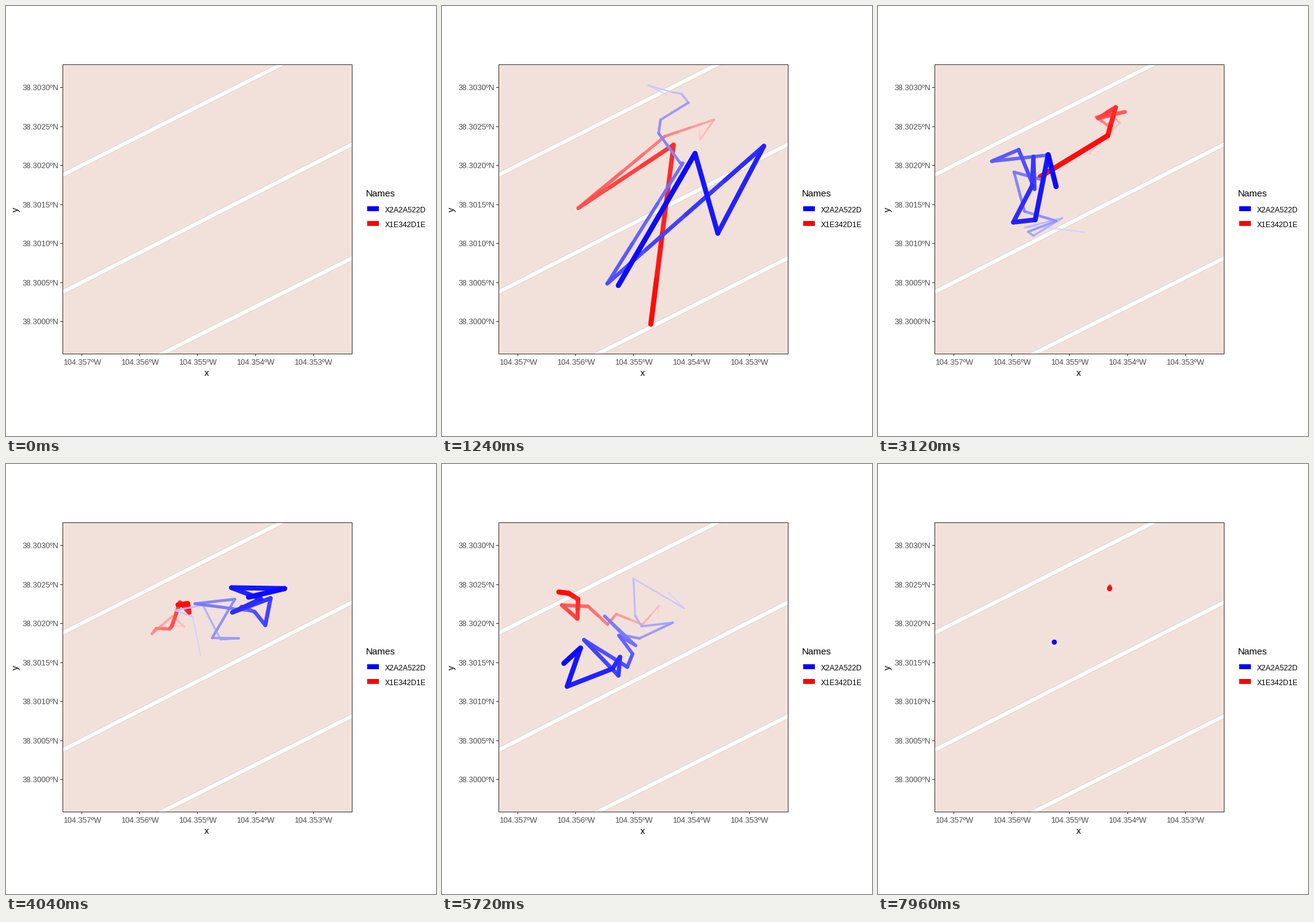
A matplotlib script that plays this animation: 700 by 700 pixels, repeating every 8000 ms.

```python
import numpy as np
import matplotlib.pyplot as plt
from matplotlib.animation import FuncAnimation
from matplotlib.collections import LineCollection
from matplotlib.patches import Rectangle

SIZE, DPI = 700, 100
FRAMES, INTERVAL = 200, 40
TAIL = 20                      # fixes shown at once
FADE = 23                      # steps until a segment would be white
THIN, THICK = 2.2, 8.7         # tail widths in pixels
REST = 178                     # both animals settle down here
PT = 72 / DPI
LEFT, TOP, SIDE = 92.5, 95.5, 471

plt.rcParams["font.family"] = "Liberation Sans"

# turning points (frame, x, y) of each animal
RED_TURNS = [(0, 300, 260), (16, 443, 185), (20, 363, 212), (24, 222, 329),
             (27, 377, 226), (31, 340, 518), (34, 384, 319), (37, 262, 478),
             (42, 145, 368), (46, 265, 310), (48, 380, 211), (50, 346, 262),
             (74, 387, 165), (77, 374, 211), (78, 264, 278), (117, 297, 191),
             (119, 308, 243), (123, 320, 184), (124, 351, 250), (146, 131, 220),
             (155, 360, 289), (157, 270, 242), (161, 387, 188),
             (REST, 378, 195), (199, 377, 203)]
BLUE_TURNS = [(0, 330, 240), (15, 390, 143), (21, 392, 256), (24, 269, 452),
              (28, 524, 228), (29, 449, 370), (30, 412, 240), (31, 287, 455),
              (40, 239, 376), (48, 396, 354), (49, 266, 422), (50, 374, 324),
              (63, 253, 374), (71, 229, 234), (76, 256, 348), (77, 277, 242),
              (78, 290, 294), (105, 432, 202), (117, 392, 303), (124, 369, 209),
              (144, 219, 355), (154, 254, 403), (157, 388, 185),
              (160, 254, 362), (161, 367, 172),
              (REST, 287, 289), (199, 287, 290)]


def roam(turns, spread, step, seed):
    """One fix per frame: short hops are straight, longer ones wander."""
    rng = np.random.default_rng(seed)
    fixes = [turns[0]]
    for (t0, x0, y0), (t1, x1, y1) in zip(turns, turns[1:]):
        if t1 - t0 > 4 and t0 < REST:
            for t in range(t0 + step, t1, step):
                u = (t - t0) / (t1 - t0)
                dx, dy = rng.uniform(-1, 1, 2) * spread
                fixes.append((t, x0 + u * (x1 - x0) + dx, y0 + u * (y1 - y0) + dy))
        fixes.append((t1, x1, y1))
    t, x, y = np.array(fixes, float).T
    n = np.arange(FRAMES)
    return np.column_stack([np.interp(n, t, x), np.interp(n, t, y)])


fig = plt.figure(figsize=(SIZE / DPI, SIZE / DPI), dpi=DPI, facecolor="white")
ax = fig.add_axes([0, 0, 1, 1])
ax.set_xlim(0, SIZE)
ax.set_ylim(SIZE, 0)
ax.axis("off")


def box(x, y, w, h, **kw):
    patch = Rectangle((x, y), w, h, snap=False, **kw)
    ax.add_patch(patch)
    return patch


def line(x, y, colour, width, **kw):
    return ax.plot(x, y, color=colour, lw=width * PT, snap=False,
                   solid_capstyle="butt", **kw)[0]


def label(x, y, text, px, colour="black", **kw):
    ax.text(x, y, text, fontsize=px * PT, color=colour, **kw)


# map panel with three roads
panel = box(LEFT, TOP, SIDE, SIDE, fc="#f2e1da", ec="none", zorder=0)
roads = [((72, 285.3), (470, 84)),
         ((72, 476), (583, 215)),
         ((235, 575.5), (583, 400.5))]
for (x0, y0), (x1, y1) in roads:
    for colour, width in (("#e0d5cf", 8), ("white", 6)):
        line((x0, x1), (y0, y1), colour, width, zorder=1).set_clip_path(panel)
box(LEFT, TOP, SIDE, SIDE, fc="none", ec="#333333", lw=PT, zorder=5)

# axes
for i in range(7):
    y = round(512.9 - 63.4 * i) + 0.5
    line((88, 92), (y, y), "#333333", 1)
    label(85.3, y + 4.5, f"{38.3 + 0.0005 * i:.4f}ºN", 12.6, "#4d4d4d", ha="right")
for i in range(5):
    x = round(122.6 + 94.4 * i) + 0.5
    line((x, x), (567, 570), "#333333", 1)
    label(x, 584, f"{104.357 - 0.001 * i:.3f}ºW", 12.6, "#4d4d4d", ha="center")
label(326.5, 602, "x", 14.7, ha="center")
label(16, 331, "y", 14.7, ha="center", va="center", rotation=90)

# legend
label(585.5, 310, "Names", 15.1)
for y, colour, name in ((326, "#0000ff", "X2A2A522D"), (350, "#ff0000", "X1E342D1E")):
    box(588, y, 19, 8, fc=colour, ec="none")
    label(616.5, y + 10, name, 12.1)

tails = []
for z, (turns, spread, step, seed, colour) in enumerate((
        (RED_TURNS, (36, 24), 2, 5, (1, 0, 0)),
        (BLUE_TURNS, (48, 42), 1, 8, (0, 0, 1)))):
    lines = LineCollection([], capstyle="round", zorder=3 + z)
    lines.set_snap(False)
    ax.add_collection(lines, autolim=False)
    tails.append((lines, roam(turns, spread, step, seed), np.array(colour)))


def update(n):
    first = max(0, n - TAIL + 1)
    age = n - np.arange(first, n)          # age of each segment's start
    white = (age / FADE)[:, None]
    widths = THICK - (THICK - THIN) * age / (TAIL - 1)
    for lines, pts, colour in tails:
        lines.set_segments([pts[i:i + 2] for i in range(first, n)])
        lines.set_color(colour * (1 - white) + white)
        lines.set_linewidth(widths * PT)
    return [t[0] for t in tails]


anim = FuncAnimation(fig, update, frames=FRAMES, interval=INTERVAL,
                     init_func=lambda: update(0), repeat=True, repeat_delay=0)
plt.show()
```
